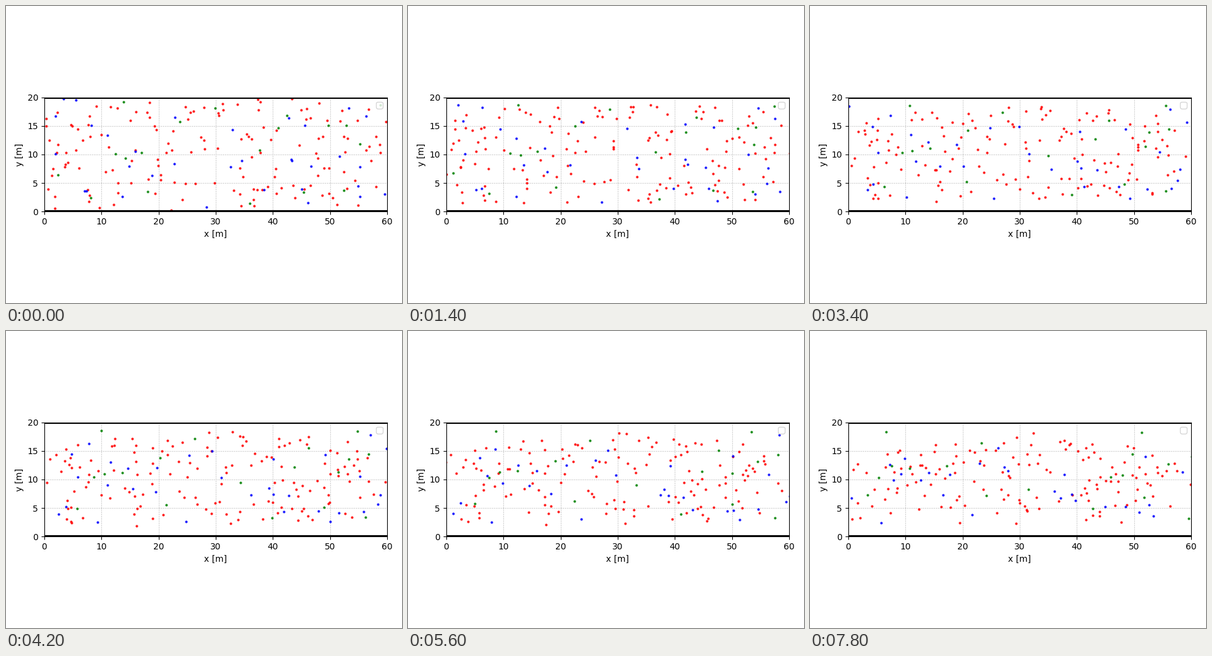
Animation, 640 px wide and 480 px high, one loop 8 s. Source, as a matplotlib script:

```python
import matplotlib.pyplot as plt
import numpy as np
from matplotlib.animation import FuncAnimation

W, H, DPI = 640, 480, 100
LENGTH, WIDTH = 60, 20
FRAMES, STEP = 40, 0.2
GROUPS = {"red": 148, "blue": 33, "green": 19}
MARGIN = 1.5       # distance walkers like to keep from the walls
CROSS_TIME = 22    # seconds to drift to the wanted y


def avoid(pos):
    """Shift that moves each walker away from its close neighbours."""
    gap = pos[:, None] - pos[None]
    dist = np.hypot(gap[..., 0], gap[..., 1])[..., None] + 1e-6
    return (gap / dist * 0.16 * np.exp(-dist / 0.45)).sum(axis=1)


def walk(count, seed=7):
    """Positions of two opposing streams, shaped (frame, walker, xy)."""
    rng = np.random.default_rng(seed)
    pos = rng.uniform((0, 0.2), (LENGTH, WIDTH - 0.2), (count, 2))
    goal = rng.uniform(MARGIN, WIDTH - MARGIN, count)
    side = rng.choice((-1, 1), count)
    speed = rng.normal(0.92, 0.04, count)
    vy = (goal - pos[:, 1]) / CROSS_TIME
    vel = np.column_stack((side * np.sqrt(speed**2 - vy**2), vy))

    path = [pos]
    for _ in range(FRAMES - 1):
        pos = pos + vel * STEP + avoid(pos)
        inside = np.clip(pos[:, 1], MARGIN, WIDTH - MARGIN)
        pos[:, 1] += 0.2 * (inside - pos[:, 1])
        path.append(pos)
    return np.array(path)


fig, ax = plt.subplots(figsize=(W / DPI, H / DPI), dpi=DPI)
ax.set(xlim=(0, LENGTH), ylim=(0, WIDTH), xlabel="x [m]", ylabel="y [m]")
ax.set_aspect("equal")
ax.set_xticks(range(0, LENGTH + 1, 10))
ax.set_yticks(range(0, WIDTH + 1, 5))
ax.grid(linestyle=":")

dots = [ax.plot([], [], "o", ms=2, color=color, alpha=0.8)[0]
        for color in GROUPS]
for y in (0, WIDTH):
    ax.plot((0, LENGTH), (y, y), color="black", lw=3)
ax.legend(handles=[], labels=[], loc="upper right")
fig.tight_layout()

crowd = walk(sum(GROUPS.values()))
paths = np.split(crowd, np.cumsum(list(GROUPS.values()))[:-1], axis=1)


def draw(i):
    for line, path in zip(dots, paths):
        line.set_data(path[i, :, 0], path[i, :, 1])
    return dots


anim = FuncAnimation(fig, draw, frames=FRAMES, interval=200,
                     repeat=True, repeat_delay=0)
plt.show()
```
